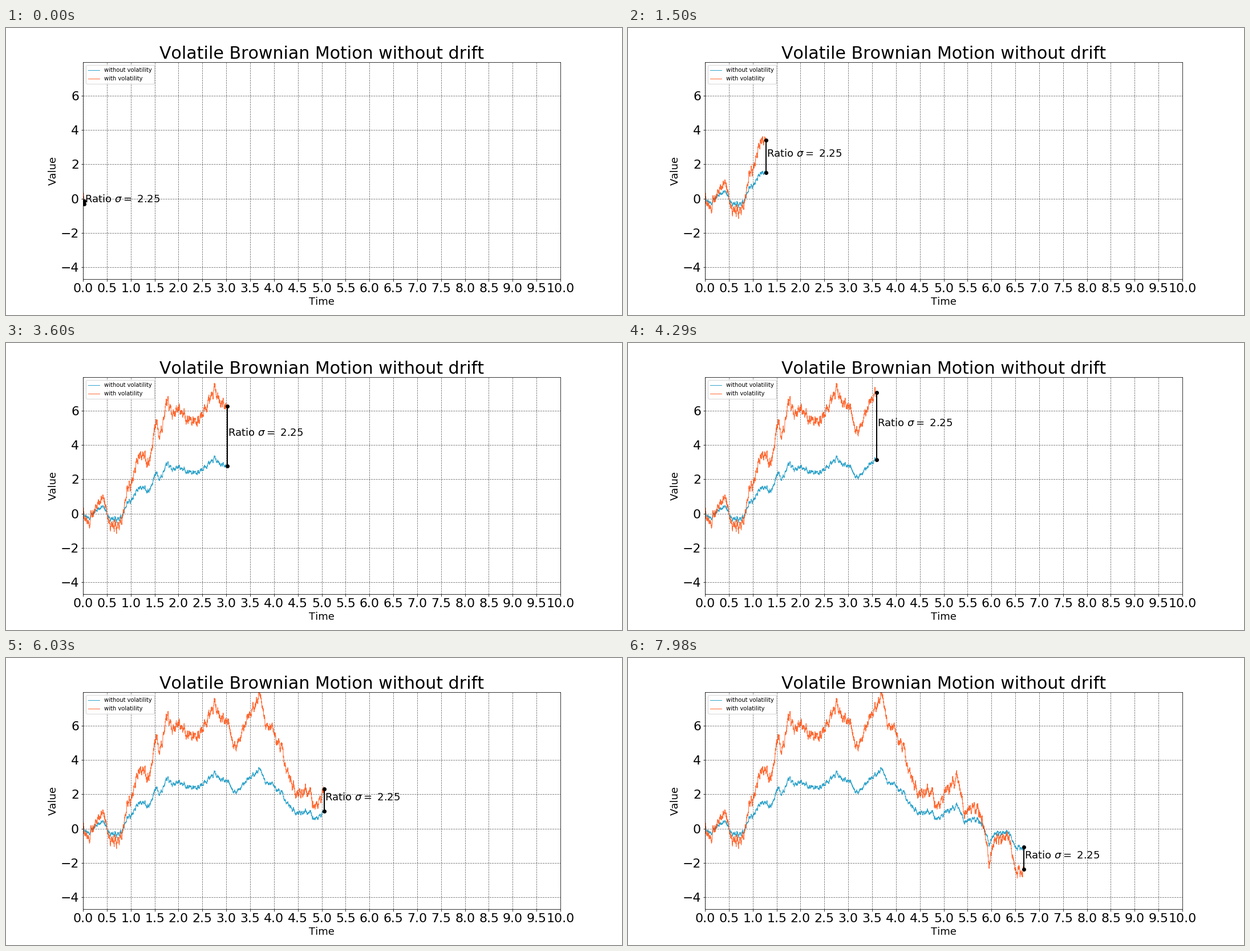
Recreate the animation shown at these times as a matplotlib script. Size 1080x504 px, loop 8000 ms.

```python
import numpy as np
import matplotlib.pyplot as plt
from matplotlib.animation import FuncAnimation

LOOP_MS = 8000
FRAMES = 267
DT = 0.001
POINTS_PER_FRAME = 25
SIGMA = 2.25
RIPPLE_WINDOW = 81

# Main turning points (time, value) of the volatile path
TURNS = np.array([
    (0, 0), (.005, .33), (.025, -.3), (.14, -.8), (.22, 0), (.43, .9),
    (.56, -.6), (.75, -.8), (.86, .1), (.92, 1.5), (1, 1.6), (1.17, 3.4),
    (1.275, 3.4), (1.38, 2.9), (1.53, 5.4), (1.61, 4.5), (1.77, 6.6),
    (1.88, 5.8), (2, 6.2), (2.15, 5.4), (2.4, 5.6), (2.65, 6.5), (2.75, 7.6),
    (2.9, 6.5), (3.025, 6.27), (3.18, 5), (3.45, 6.4), (3.72, 7.7),
    (3.83, 5.8), (3.99, 5.7), (4.05, 4.9), (4.175, 4.7), (4.23, 3.7),
    (4.46, 2), (4.75, 2.4), (4.85, 1.3), (5.05, 2.3), (5.3, 2.7), (5.43, .7),
    (5.67, 1.1), (5.84, 0), (5.95, -2.27), (6.07, -.6), (6.37, -.5),
    (6.49, -2.3), (6.675, -2.38),
])


def make_path():
    """Trend through the turning points plus a detrended random walk."""
    time = np.arange(FRAMES * POINTS_PER_FRAME + 1) * DT
    steps = np.random.default_rng(7).normal(0, 0.058, time.size + RIPPLE_WINDOW - 1)
    walk = np.cumsum(steps)
    mean = np.convolve(walk, np.ones(RIPPLE_WINDOW) / RIPPLE_WINDOW, "valid")
    half = RIPPLE_WINDOW // 2
    ripple = walk[half:half + time.size] - mean

    knots, values = TURNS.T
    offset = values - np.interp(knots, time, ripple)
    return time, ripple + np.interp(time, knots, offset)


time, volatile = make_path()
plain = volatile / SIGMA

plt.rcParams["text.kerning_factor"] = 6
fig, ax = plt.subplots(figsize=(15, 7), dpi=72)
fig.subplots_adjust(left=0.125, right=0.9, bottom=0.125, top=0.88)
ax.set_xlim(0, 10)
ax.set_ylim(-4.687, 7.934)
ax.set_xticks(np.arange(0, 10.5, 0.5))
ax.set_yticks(range(-4, 7, 2))
ax.tick_params(labelsize=22)
ax.grid(color="black", linestyle="--", linewidth=0.8, alpha=0.6)
ax.set_title("Volatile Brownian Motion without drift", fontsize=30)
ax.set_xlabel("Time", fontsize=18)
ax.set_ylabel("Value", fontsize=18)

plain_line, = ax.plot([], [], color="#008fbf", lw=1, alpha=0.8,
                      label="without volatility")
volatile_line, = ax.plot([], [], color="orangered", lw=1, alpha=0.8,
                         label="with volatility")
gap, = ax.plot([], [], "k-o", lw=2, markersize=6)
label = ax.text(0, 0, r"Ratio $\sigma =$ 2.25", fontsize=18)
ax.legend(loc="upper left", fontsize=10)


def update(frame):
    end = (frame + 1) * POINTS_PER_FRAME
    now, low, high = time[end], plain[end], volatile[end]
    plain_line.set_data(time[:end + 1], plain[:end + 1])
    volatile_line.set_data(time[:end + 1], volatile[:end + 1])
    gap.set_data([now, now], [low, high])
    label.set_position((now + 0.01, (low + high) / 2))
    return plain_line, volatile_line, gap, label


anim = FuncAnimation(fig, update, frames=FRAMES, interval=LOOP_MS / FRAMES,
                     repeat=True, repeat_delay=0)
plt.show()
```
